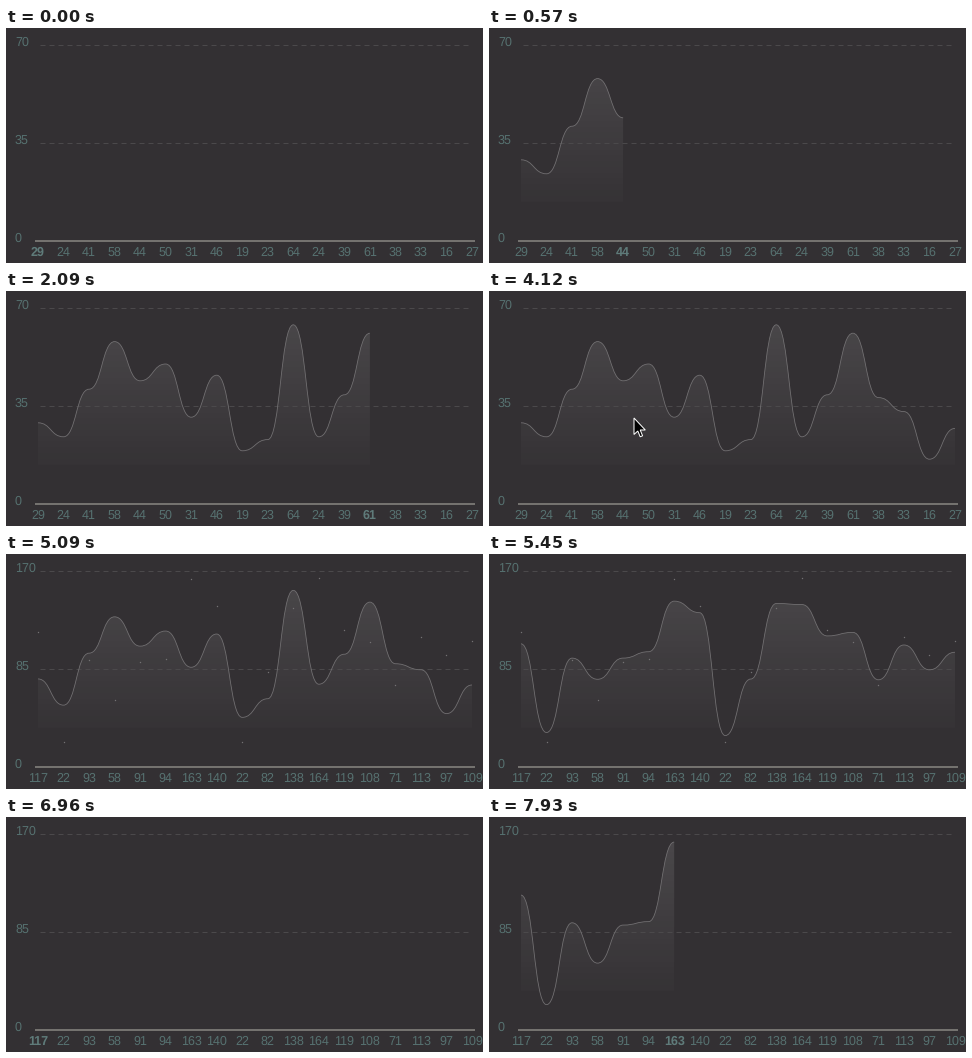
These frames come from a looping animation (477 px wide and 235 px high, 8000 ms). A matplotlib script:

```python
import numpy as np
import matplotlib.pyplot as plt
from matplotlib.animation import FuncAnimation
from matplotlib.path import Path
from matplotlib.patches import PathPatch, Polygon

W, H, DPI = 477, 235, 64
PX = 72 / DPI                     # points per pixel
INTERVAL, LOOP = 20, 8000
BASE, TOP, FADE_END = 213, 17, 174

BG, AXIS, GRID = "#333033", "#85837f", "#4b494b"
LABEL, ACTIVE, STROKE = "#567170", "#5f7b7a", "#737173"

FIRST = [29, 24, 41, 58, 44, 50, 31, 46, 19, 23, 64, 24, 39, 61, 38, 33, 16, 27]
SECOND = [117, 22, 93, 58, 91, 94, 163, 140, 22, 82, 138, 164, 119, 108, 71, 113, 97, 109]
XS = np.linspace(32, 466, len(FIRST))

# Moments at which the chart reveals one more point.
REVEAL_1 = [0, 150, 300, 420, 570, 720, 870, 1120, 1270, 1400, 1550,
            1700, 1820, 2090, 2210, 2330, 2450, 2730]
REVEAL_END = 2850
REVEAL_2 = [6960, 7110, 7240, 7380, 7510, 7810, 7930]
MORPH = [4970, 5090, 5210, 5330, 5450, 5570, 5720, 5840]
MORPH_TIME = 1000
CURSOR = [(4120, 4240, 145, 127), (4240, 4390, 129, 225), (5840, 5990, 179, 13)]


def to_y(values, top_value):
    return BASE - np.array(values) * (BASE - TOP) / top_value


Y1, Y2 = to_y(FIRST, 70), to_y(SECOND, 170)


def ease(p):
    """CSS 'ease': cubic-bezier(.25, .1, .25, 1)."""
    s = np.linspace(0, 1, 200)
    x = 0.75 * s * (1 - s) ** 2 + 0.75 * s ** 2 * (1 - s) + s ** 3
    y = 0.3 * s * (1 - s) ** 2 + 3 * s ** 2 * (1 - s) + s ** 3
    return np.interp(p, x, y)


def last_step(times, t):
    return int(np.searchsorted(times, t, side="right")) - 1


def state(t):
    """Return second data set?, heights, last visible point, active label."""
    if t < REVEAL_END:
        k = last_step(REVEAL_1, t)
        return False, Y1, k, k
    if t < MORPH[0]:
        return False, Y1, len(XS) - 1, None
    if t < REVEAL_2[0]:
        held = MORPH[last_step(MORPH, t)]
        p = 1 if held == MORPH[-1] else ease((held - MORPH[0]) / MORPH_TIME)
        return True, Y1 + (Y2 - Y1) * p, len(XS) - 1, None
    k = last_step(REVEAL_2, t)
    return True, Y2, k, k


def curve(ys, last):
    """Smooth line with a level tangent at every point."""
    verts = [(XS[0], ys[0])]
    for i in range(last):
        mid = (XS[i] + XS[i + 1]) / 2
        verts += [(mid, ys[i]), (mid, ys[i + 1]), (XS[i + 1], ys[i + 1])]
    return verts, [Path.MOVETO] + [Path.CURVE4] * (3 * last)


plt.rcParams["text.hinting"] = "none"
fig = plt.figure(figsize=(W / DPI, H / DPI), dpi=DPI, facecolor=BG)
ax = fig.add_axes([0, 0, 1, 1])
ax.axis("off")

ramp = np.ones((FADE_END, 1, 4))
ramp[:, 0, 3] = np.interp(np.arange(FADE_END), [20, FADE_END], [0.12, 0.015])
fill = ax.imshow(ramp, extent=(0, W, FADE_END, 0), aspect="auto",
                 interpolation="nearest", zorder=1)
ax.set_xlim(0, W)
ax.set_ylim(H, 0)

for y in (16.5, 114.5):
    ax.plot([34, 463], [y, y], color=GRID, lw=PX, zorder=2,
            dashes=(5, 4), dash_capstyle="butt")
ax.plot([29, 469], [BASE, BASE], color=AXIS, lw=1.6 * PX,
        solid_capstyle="butt", zorder=2)

line = ax.add_patch(PathPatch(Path([(0, 0)]), fill=False, ec=STROKE,
                              lw=0.8 * PX, zorder=3))
dots, = ax.plot(XS, Y2, "o", ms=1.4 * PX, mew=0, color=STROKE, zorder=3)

FONT = dict(family="Liberation Sans", fontsize=12.5 * PX, color=LABEL, va="baseline")
x_labels = [ax.text(x, 228, "", ha="center", **FONT) for x in XS]
y_labels = [ax.text(9, y, "", ha="left", **FONT) for y in (17.5, 115.5, 213.5)]

ARROW = np.array([(0, 0), (0, 16.5), (3.8, 13), (6.2, 18.8),
                  (8.6, 17.8), (6.2, 12), (11.3, 12)])
cursor = ax.add_patch(Polygon(ARROW, fc="black", ec="white", lw=PX, zorder=5))


def draw(frame):
    t = frame * INTERVAL + INTERVAL / 2
    second, ys, last, active = state(t)

    for i, (label, value) in enumerate(zip(x_labels, SECOND if second else FIRST)):
        label.set_text(str(value))
        label.set_weight("bold" if i == active else "normal")
        label.set_color(ACTIVE if i == active else LABEL)
    for label, value in zip(y_labels, (170, 85, 0) if second else (70, 35, 0)):
        label.set_text(str(value))

    shown = last > 0
    line.set_visible(shown)
    fill.set_visible(shown)
    if shown:
        verts, codes = curve(ys, last)
        line.set_path(Path(verts, codes))
        area = Path(verts + [(XS[last], BASE), (XS[0], BASE), verts[0]],
                    codes + [Path.LINETO] * 2 + [Path.CLOSEPOLY])
        fill.set_clip_path(area, ax.transData)
    dots.set_visible(MORPH[0] <= t < MORPH[-1])

    cursor.set_visible(False)
    for start, end, x, y in CURSOR:
        if start <= t < end:
            cursor.set_xy(ARROW + (x, y))
            cursor.set_visible(True)
    return []


anim = FuncAnimation(fig, draw, frames=LOOP // INTERVAL, interval=INTERVAL,
                     repeat=True, repeat_delay=0, blit=False)
plt.show()
```
